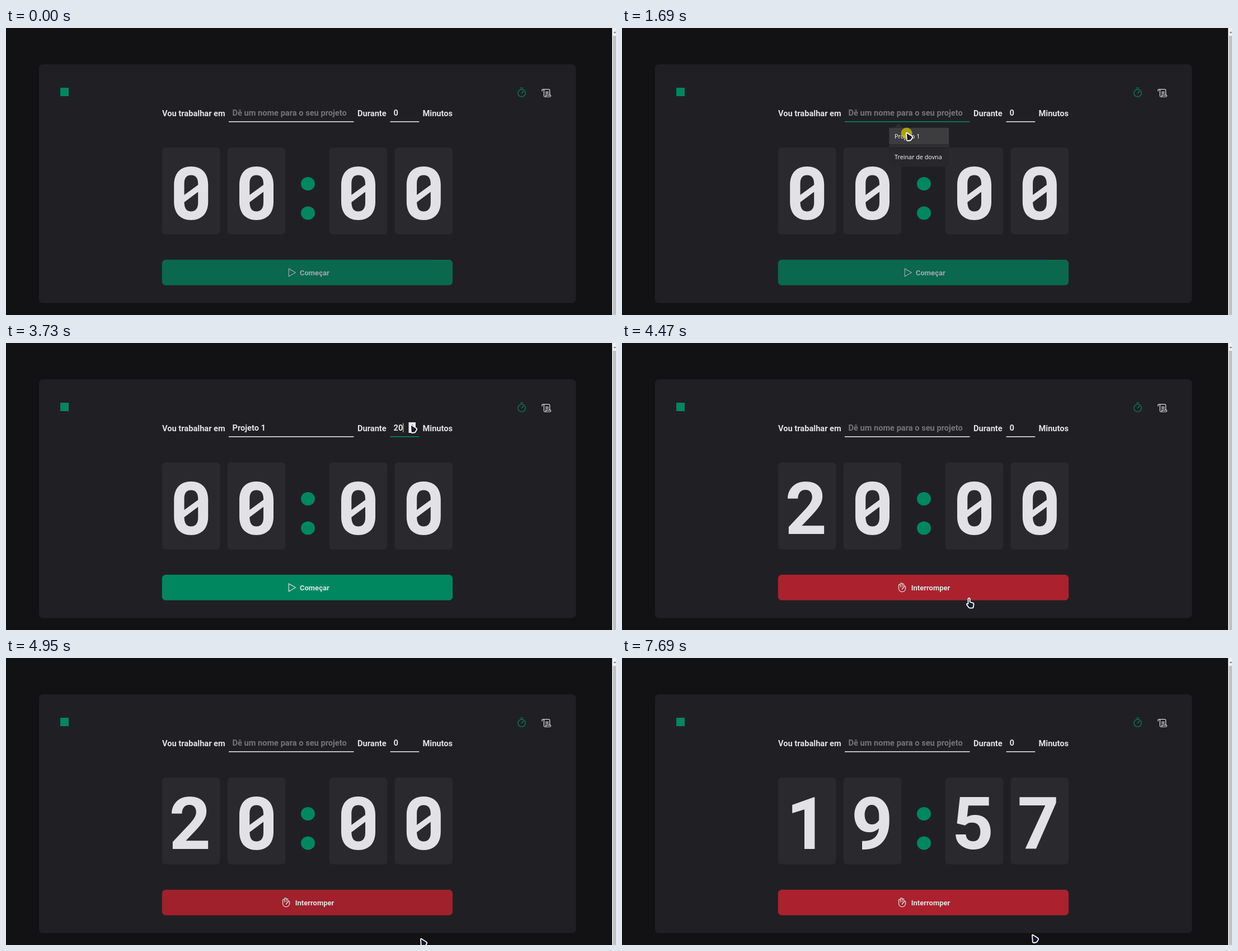
An HTML page that plays this animation: 1090 px wide and 514 px high, repeating every 8.42 s.

```html
<!DOCTYPE html>
<html lang="pt-BR">
<head>
<meta charset="utf-8">
<title>Timer</title>
<style>
html, body { margin: 0; width: 100%; height: 100%; overflow: hidden; background: #121214; }
svg { display: block; width: 1090px; height: 514px; overflow: hidden; }
text { font-family: Roboto, sans-serif; font-weight: 700; fill: #e1e1e6; }
.label { font-size: 14.625px; }
.action { font-size: 13px; }
.digit { font-size: 130px; text-anchor: middle; }
.option { font: 400 10.8px "Open Sans", "Noto Sans", sans-serif; fill: #fff; }
.icon { fill: none; stroke: #e1e1e6; stroke-width: 16; stroke-linecap: round; stroke-linejoin: round; }
.cursor { fill: #121a2a; stroke: #fff; stroke-width: 1.8; stroke-linejoin: round; }
</style>
</head>
<body>
<svg viewBox="0 0 1090 514">
  <defs>
    <path id="zero" fill="#e1e1e6" fill-rule="evenodd" d="M0-48C19-48 30.5-36 30.5-15V15C30.5 36 19 48 0 48S-30.5 36-30.5 15V-15C-30.5-36-19-48 0-48Z
      M0-32.5C-8.5-32.5-12.2-27-12.2-17V3L12.5-15V-17C12.5-27 8.5-32.5 0-32.5Z
      M12.5-2.5L-12.2 16C-12 27-8 32.5 0 32.5S12.5 27 12.5 17Z"/>
  </defs>
  <rect width="1090" height="514" fill="#121214"/>
  <rect x="59" y="65" width="959.5" height="427.5" rx="6.5" fill="#202024"/>
  <rect x="97" y="107" width="15" height="15" fill="#00875f"/>
  <g class="icon" transform="translate(911.7 106.8) scale(.0762)" style="stroke:#00875f">
    <circle cx="128" cy="128" r="88"/><path d="M128 128l40-40M104 8h48"/>
  </g>
  <g class="icon" transform="translate(956.4 106.8) scale(.0762)">
    <path d="M24 80S16 74 16 64a24 24 0 0 1 48 0V192a24 24 0 0 0 48 0c0-10-8-16-8-16H216s8 6 8 16a24 24 0 0 1-24 24H88M40 40H176a24 24 0 0 1 24 24V176M104 104h64M104 136h64"/>
  </g>

  <g class="label">
    <text x="279" y="158">Vou trabalhar em</text>
    <text x="628" y="158">Durante</text>
    <text x="744.5" y="158">Minutos</text>
    <text id="project" x="404.5" y="156.5"></text>
    <text id="minutes" x="692.5" y="156.5"></text>
  </g>
  <rect id="projectLine" x="398" y="167" width="223.5" height="1.6"/>
  <rect id="minutesLine" x="686.5" y="167" width="51.7" height="1.6"/>
  <rect id="caret" x="709.3" y="143.5" width="1" height="16.5" fill="#e8e2bd"/>
  <g id="spinner">
    <rect x="719.5" y="142" width="12.5" height="19" fill="#e9e9e9"/>
    <path d="M722.8 149l3-3.5 3 3.5zM722.8 154l3 3.5 3-3.5z" fill="#404044"/>
  </g>

  <g id="clock"></g>
  <g fill="#00875f">
    <ellipse cx="539.5" cy="279" rx="12.5" ry="12"/>
    <ellipse cx="539.5" cy="331.5" rx="12.5" ry="12"/>
  </g>

  <g id="button">
    <rect id="buttonFace" x="278.8" y="415" width="519.3" height="45.7" rx="6.5"/>
    <g id="start">
      <path class="icon" transform="translate(499.8 428.2) scale(.0762)" d="M72 36V220L230 128Z"/>
      <text class="action" x="525" y="442.6">Começar</text>
    </g>
    <g id="stop">
      <path class="icon" transform="translate(490.8 428) scale(.0762)"
        d="M168 136V116a20 20 0 0 1 40 0v36a80 80 0 0 1-160 0V76a20 20 0 0 1 40 0v44M88 120V44a20 20 0 0 1 40 0v68M128 112V60a20 20 0 0 1 40 0v76a40 40 0 0 0-40 40"/>
      <text class="action" x="516.8" y="442.6">Interromper</text>
    </g>
  </g>

  <g id="menu">
    <path d="M487 178l7-7 7 7z" fill="#2d2d31"/>
    <rect x="477" y="178" width="107.5" height="70.5" fill="#28282c"/>
    <rect x="477.5" y="179" width="106.5" height="29.5" fill="#3d3d40"/>
    <rect x="477.5" y="211" width="106.5" height="1" fill="#414145"/>
    <text class="option" x="487" y="198">Projeto 1</text>
    <text class="option" x="487" y="234.5">Treinar de dovna</text>
  </g>

  <rect x="1083" width="7" height="514" fill="#f1f1f1"/>
  <rect x="1084.5" y="14" width="5.5" height="500" fill="#c1c1c1"/>
  <path d="M1085.5 9l2.5-3 2 3z" fill="#777"/>

  <circle id="ring" r="10" fill="#ccc400" opacity=".75"/>
  <g id="pointer" class="cursor">
    <path id="arrow" d="M2.5 1L11 6.5Q12.8 8 11.8 9.5L9.7 13Q9 14.3 7.5 14.5L3.5 15Q2 15 1.8 13.5L1 2Q1 .2 2.5 1Z"/>
    <path id="hand" d="M3.5 11V2.5a1.6 1.6 0 0 1 3.2 0V8l5 1.3q2 .6 1.8 2.6L13 16q-.5 2.7-2.5 2.7H6.8q-1.7 0-2.7-1.6L1 12.5Q.6 10.8 2 10.8Z"/>
  </g>
</svg>
<script>
const LOOP = 8420, STEP = 70;
const $ = id => document.getElementById(id);
const show = (id, on) => $(id).setAttribute('display', on ? 'inline' : 'none');
const fill = (id, color) => $(id).setAttribute('fill', color);
const within = (t, from, to) => t >= from && t < to;
const clamp = v => Math.max(0, Math.min(1, v));
const mix = (a, b, k) => `rgb(${a.map((v, i) => Math.round(v + (b[i] - v) * k))})`;

const GREEN = [0, 135, 95], DARK_GREEN = [1, 95, 67];
const RED = [171, 34, 46], DARK_RED = [122, 25, 33];
const SELECTED = 1760, STARTED = 4460;

// Pointer moves: start, end, x, y
const moves = [
  [250, 800, 488, 144.5], [1150, 1150, 488, 146.5], [1360, 1570, 507, 187],
  [1820, 1960, 465, 174], [2030, 2380, 750, 145], [2580, 2580, 729, 147],
  [2650, 2650, 722, 146], [4000, 4350, 615, 456], [4530, 4600, 603, 449],
  [4740, 4810, 645, 468], [4880, 4950, 740, 502], [5020, 5020, 741, 505],
  [5370, 5430, 738, 502], [7550, 7690, 732, 495]
];
const clicks = [[870, 1010], [1150, 1290], [1620, 1760], [2650, 2930],
  [3200, 3340], [3410, 3520], [3590, 3730], [4390, STARTED]];
const values = [[0, 0], [2650, 5], [3200, 10], [3410, 15], [3590, 20], [STARTED, 0]];
const readings = [[0, '0000'], [STARTED, '2000'], [5700, '1959'], [6690, '1958'], [7690, '1957']];
const latest = (list, t) => list.filter(([from]) => from <= t).pop()[1];

// Small optical shifts of the digits inside their cards
const shifts = { 1: 0, 2: -2, 5: -2.7, 7: -2.5, 8: -1, 9: -.5 };
const cards = [278.8, 395.6, 577.6, 694.4].map(x => {
  const center = x + 51.9;
  $('clock').insertAdjacentHTML('beforeend',
    `<g><rect x="${x}" y="214" width="103.8" height="155.8" rx="6.5" fill="#29292e"/>
     <use href="#zero" x="${center}" y="296"/><text class="digit" y="342.2"></text></g>`);
  const [, zero, text] = $('clock').lastElementChild.children;
  return { center, zero, text };
});

function setDigit({ center, zero, text }, digit) {
  const isZero = digit === '0';
  zero.setAttribute('display', isZero ? 'inline' : 'none');
  text.textContent = isZero ? '' : digit;
  text.setAttribute('x', center + (shifts[digit] || 0));
}

function pointerAt(t) {
  let x = 1022, y = 488;
  for (const [start, end, toX, toY] of moves) {
    if (t < start) break;
    const k = clamp((Math.floor((t - start) / STEP) + 1) * STEP / (end - start + STEP));
    const eased = k * k * (3 - 2 * k);
    x += (toX - x) * eased;
    y += (toY - y) * eased;
  }
  return [x, y];
}

function faceColor(t) {
  if (t < STARTED) return mix(GREEN, DARK_GREEN, clamp((t - 4280) / 200));
  const hover = t < 4880 ? clamp((t - 4670) / 300) : clamp((5020 - t) / 300);
  return mix(RED, DARK_RED, hover);
}

function render(t) {
  const chosen = within(t, SELECTED, STARTED);
  const running = t >= STARTED;
  $('project').textContent = chosen ? 'Projeto 1' : 'Dê um nome para o seu projeto';
  $('project').style.fill = chosen ? '#e1e1e6' : '#757577';
  $('minutes').textContent = latest(values, t);
  fill('projectLine', within(t, 870, 2650) ? '#00875f' : '#e1e1e6');
  fill('minutesLine', within(t, 2650, STARTED) ? '#00875f' : '#e1e1e6');
  show('spinner', within(t, 2580, STARTED));
  show('caret', within(t, 3590, STARTED));
  show('menu', within(t, 1220, SELECTED));

  const reading = latest(readings, t);
  cards.forEach((card, i) => setDigit(card, reading[i]));

  $('button').setAttribute('opacity', t < SELECTED ? .7 : 1);
  fill('buttonFace', faceColor(t));
  show('start', !running);
  show('stop', running);

  const [x, y] = pointerAt(t);
  const overButton = within(t, 4280, 4800);
  show('pointer', t >= 250);
  show('arrow', !overButton);
  show('hand', overButton);
  $('pointer').setAttribute('transform', `translate(${x} ${y})`);
  show('ring', clicks.some(([from, to]) => within(t, from, to)));
  $('ring').setAttribute('cx', x + (overButton ? 5 : 1.5));
  $('ring').setAttribute('cy', y + 1.5);
}

const begin = performance.now();
function frame(now) {
  render(Math.max(0, now - begin) % LOOP);
  requestAnimationFrame(frame);
}
render(0);
requestAnimationFrame(frame);
</script>
</body>
</html>
```
